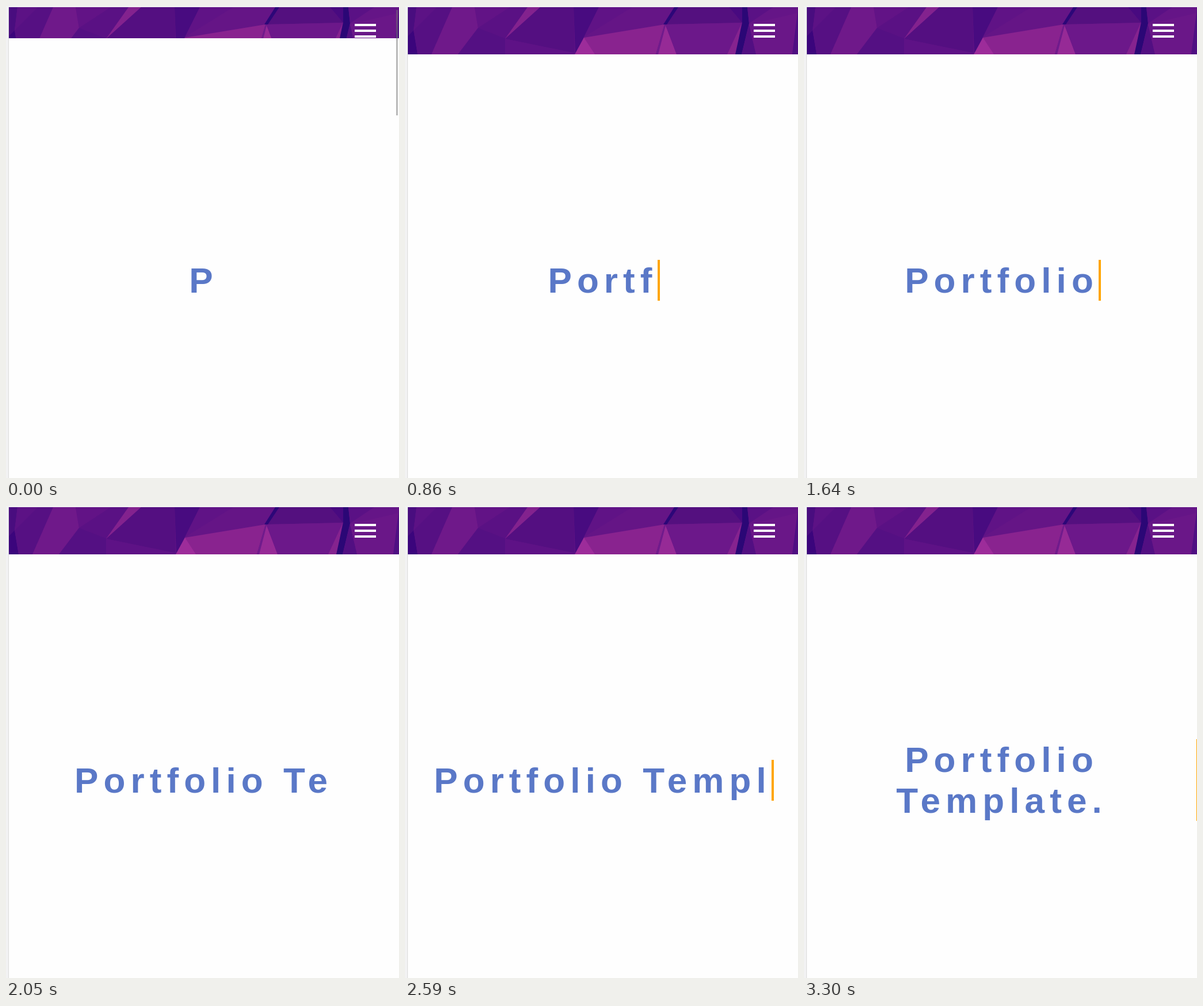
An HTML page for the animation above (3.53 s loop, 683x820 px).

```html
<!DOCTYPE html>
<html lang="en">
<head>
<meta charset="utf-8">
<title>Portfolio Template</title>
<style>
html, body { margin: 0; width: 100%; height: 100%; overflow: hidden; background: #f2f2f3; }
#stage { position: relative; width: 100%; height: 100%; overflow: hidden; contain: strict; }
#page { position: absolute; left: 4px; top: 2px; right: 0; bottom: 0; background: #fefefe; border-left: 1px solid #dcdcdc; }
svg { position: absolute; left: 0; top: 0; }
#hero { position: absolute; left: 5px; top: 376px; width: 681px; height: 200.9px; display: flex; align-items: center; justify-content: center; }
#title { font: bold 62px/71px "Liberation Sans", Arial, sans-serif; letter-spacing: 9.1px; color: #5a78c7; text-align: center; border-right: 4px solid transparent; }
#bar { position: absolute; left: 678px; top: 7px; width: 3px; height: 183px; background: #777; }
</style>
</head>
<body>
<div id="stage">
  <div id="page"></div>
  <svg width="683" height="84">
    <clipPath id="clip"><rect id="header" x="5" y="2" width="678" height="54"/></clipPath>
    <g id="facets" clip-path="url(#clip)"></g>
    <path d="M606 33h37M606 43h37M606 53h37" stroke="#fff" stroke-width="4"/>
  </svg>
  <div id="hero"><div id="title"></div></div>
  <div id="bar"></div>
</div>
<script>
const $ = id => document.getElementById(id);

// Header artwork: fill and outline of each facet
const facets = [
  ['#651587', 'M5 2H683V84H5z'],
  ['#490d7f', 'M5 2H20L15 42 5 52z'],
  ['#3b057c', 'M5 52L15 42 22 84H5z'],
  ['#5c1285', 'M20 2H55L15 42z'],
  ['#561083', 'M55 2H82L46 84H22L15 42z'],
  ['#6f198a', 'M82 2H121L127 38 92 84H46z'],
  ['#621386', 'M121 2H182L127 38z'],
  ['#5a1184', 'M182 2H213L174 56 127 38z'],
  ['#541083', 'M127 38L174 56V84H92z'],
  ['#83228e', 'M213 2H235L174 57z'],
  ['#540f81', 'M235 2H293L295 82 174 57z'],
  ['#5e1286', 'M174 57L297 82V84H174z'],
  ['#480b80', 'M293 2H337L311 54 296 83z'],
  ['#601386', 'M337 2H395L311 54z'],
  ['#651586', 'M395 2H468L451 32 311 54z'],
  ['#89238f', 'M311 55L451 32 436 84H296z'],
  ['#9d2c9a', 'M311 55L330 84H295z'],
  ['#701b8c', 'M451 32L436 84H441L454 34z'],
  ['#962a96', 'M453 34L472 84H440z'],
  ['#54107f', 'M475 2H563L586 29 453 32z'],
  ['#480a80', 'M563 2H586V29z'],
  ['#6c188a', 'M453 32L586 29 575 84H472z'],
  ['#2c0778', 'M468 2H475L455 32 449 32z'],
  ['#85238f', 'M585 30L560 84H575z'],
  ['#2b0776', 'M586 2H595L598 30 585 84H574L586 29z'],
  ['#5a1185', 'M595 2H640L598 30z'],
  ['#520f82', 'M598 32L610 84H585z'],
  ['#6a1788', 'M598 32L683 12 673 84H610z'],
  ['#4f0f82', 'M683 5V84H673z']
];
$('facets').innerHTML = facets.map(([fill, d]) => `<path fill="${fill}" d="${d}"/>`).join('');

const text = 'Portfolio Template.';
const keys = [0, 400, 540, 710, 860, 1040, 1200, 1340, 1570, 1720, 1870, 2050, 2280, 2420, 2590, 2740, 2920, 3150, 3300];
const blinks = [[260, 500], [860, 1260], [1640, 2050], [2420, 2820], [3210, 3530]];
let shown = -1;

function draw(now) {
  const t = now % 3530;
  const count = keys.filter(k => k <= t).length;
  if (count !== shown) $('title').textContent = text.slice(0, shown = count);
  const on = blinks.some(([a, b]) => t >= a && t < b);
  $('title').style.borderRightColor = on ? 'orange' : 'transparent';

  const grow = Math.min(1, Math.max(0, (t - 240) / 240));
  $('header').setAttribute('height', 54 + 28 * grow * (2 - grow));
  $('bar').style.opacity = t < 80 ? 0.5 : t < 260 ? 0.25 : 0;
  requestAnimationFrame(draw);
}
draw(0);
</script>
</body>
</html>
```
